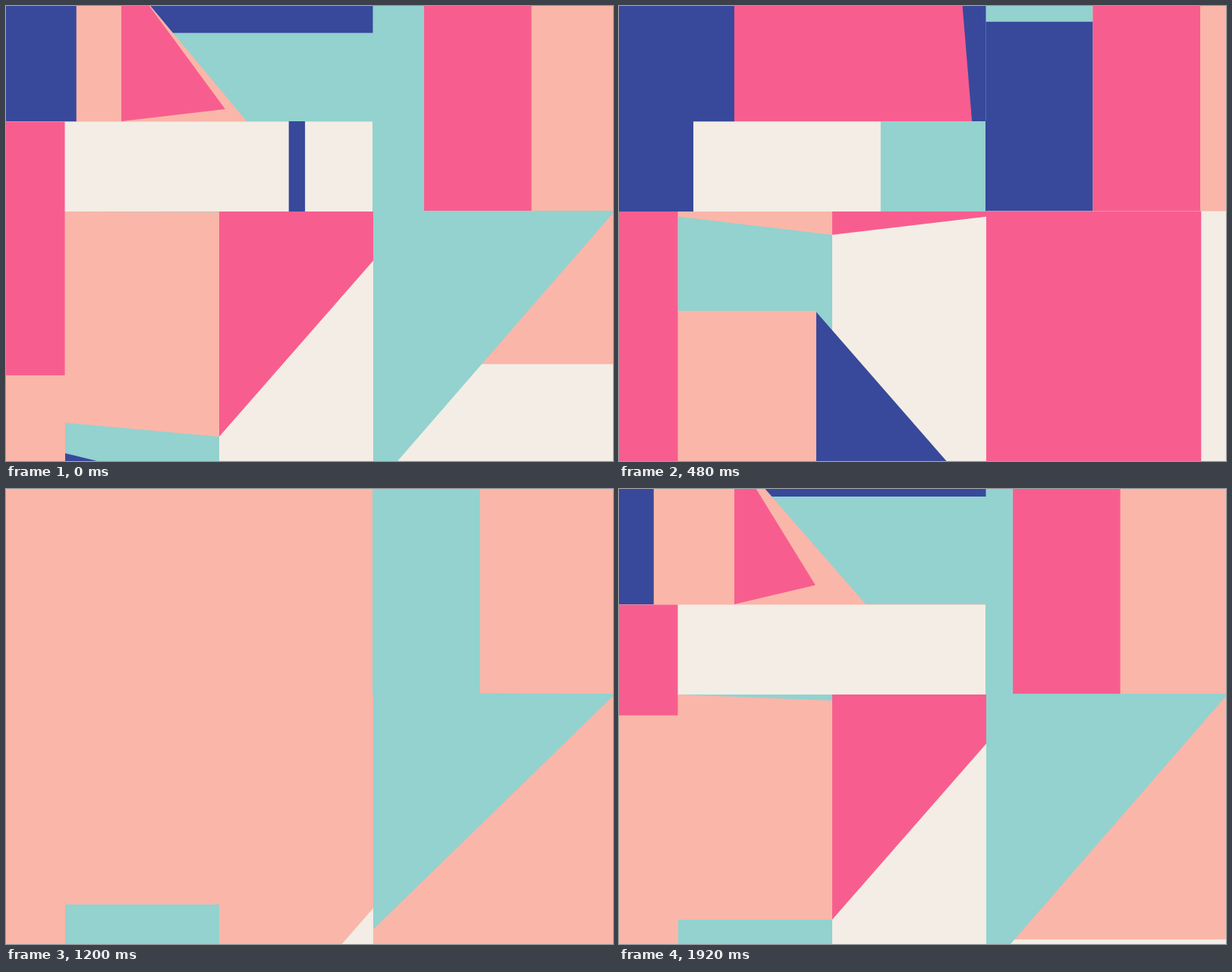
An HTML page with a canvas for the animation above (1.95 s loop, 800 px wide and 600 px high).

```html
<!DOCTYPE html>
<html lang="en">
<head>
<meta charset="utf-8">
<title>Shifting blocks</title>
<style>
  html, body { margin: 0; width: 100%; height: 100%; overflow: hidden; background: #fab6a9; }
  canvas { display: block; }
</style>
</head>
<body>
<canvas id="stage" width="800" height="600"></canvas>
<script>
const ctx = document.getElementById('stage').getContext('2d');
const LOOP = 1950, STEP = 30;
// The clock runs from the empty stage to the next empty stage.
const SEAM = 1110, END = SEAM + LOOP;
const SHIFT = 2200, SETTLED = 2551, LEAVE = 2857;
const PEACH = '#fab6a9', TEAL = '#93d2cf', PINK = '#f75e8f', CREAM = '#f3ede5', BLUE = '#38499b';
// Grid lines
const X1 = 78, X2 = 152, X3 = 281, X4 = 483.5, Y1 = 152.5, Y2 = 270.5;
const CELL = 203, COL = 141.5;

let t = SEAM;

const mix = (a, b, p) => a + (b - a) * p;

// Eased progress from start to end: quick pick-up, long settling.
function go(start, end, pull = 1.5) {
  const p = Math.min(1, Math.max(0, (t - start) / (end - start)));
  return 1 - (1 - p ** pull) ** 3;
}
const move = (a, b, start, end) => mix(a, b, go(start, end));

function poly(color, ...points) {
  ctx.fillStyle = color;
  ctx.beginPath();
  for (const [x, y] of points) ctx.lineTo(x, y);
  ctx.fill();
}
function box(color, l, t, r, b) {
  if (r > l && b > t) poly(color, [l, t], [r, t], [r, b], [l, b]);
}

function rightColumn(shift, leave) {
  const grown = move(COL, 0, 1230, 1495), slide = move(0, COL, 1873, 2101);
  const pinkLeft = 483 + grown + slide;
  const blueLeft = mix(483, 800, leave);
  if (t < SETTLED) box(TEAL, 483, 0, pinkLeft, Y2);
  box(PINK, 483, 0, blueLeft, mix(Y2, 0, leave));
  box(BLUE, blueLeft, mix(Y2, -8, shift), blueLeft + COL, Y2);
  box(PINK, pinkLeft, 0, 483 + COL + slide, move(Y2, 0, 2797, END));
}

function topPanel(shift) {
  // Slanted edge shared by teal and blue
  const swing = go(1560, 1830), hide = go(SETTLED, 2620);
  const exit = move(0, 331, 2904, END);
  const a = 143 + 57 * swing - move(0, 10, 1860, 1980) - 38 * hide + exit;
  const b = 296 + 52 * swing - move(0, 37, 1841, 2028) - 159 * hide + move(0, 331, 2880, END);
  const sheet = (color, h) => poly(color, [a, 0], [mix(a, b, h / 152), h], [X4, h], [X4, 0]);

  if (t < SETTLED) sheet(TEAL, move(0, 152, 1260, 1560));
  box(PEACH, 0, 0, X2, 152);
  sheet(BLUE, 152 * go(1904, 2235, 1.25));
  poly(PINK,
    [X2 + exit, 0],
    [mix(move(X2, 190, 1861, 1974), 483, shift), 0],
    [mix(move(X2, 311, 1832, 2024), 483, shift), move(95, 152, 1813, 2091)],
    [move(X2, 485, 2600, 2880), 152]);
  box(BLUE, 0, 0, move(0, X2, 1882, 2045), Y1);
}

function strip(shift) {
  box(CREAM, 0, Y1, move(0, 483, 1230, 1457), 271);
  box(BLUE, move(483, 77, 1920, 2059) - CELL * shift, 152, move(483, 280, 1920, 2016) - CELL * shift, 271);
  box(TEAL, move(483, 280, 2300, 2580), 152, 483, 271);
}

function lowerLeft(shift) {
  box(PINK, 0, move(Y1, 271, 2000, 2140), X1 - 0.5, move(Y1, 600, 1892, 2005));

  const top = move(600, 271, 1170, 1375);
  box(TEAL, X1, top, X3, 600);
  poly(PEACH, [X1, move(568, 271, 1700, 1930)], [X3, move(568, 271, 1700, 1979)], [X3, 568], [X1, 568]);
  const left = mix(move(568, 336, 1924, 2211), 271, shift), right = mix(568, 271, shift);
  poly(TEAL, [X1, Math.max(top, left)], [X3, Math.max(top, right)], [X3, 600], [X1, 600]);

  const grow = go(1260, 1543), x = mix(X3, 484, grow);
  if (t < SETTLED) poly(PINK, [X3, 271], [x, 271], [x, mix(300, 336, grow)], [X3, 568]);
}

function lowerRight(shift, leave) {
  if (t < SETTLED) {
    box(CREAM, 484, move(600, Y2, 1916, 2036), 800, 600);
    const tip = mix(800, 484, shift), low = move(270, 637, SEAM, 1260);
    poly(TEAL, [484, move(265, 270, SEAM, 1290)], [tip, 270], [tip, 273], [484, mix(low, 271, shift)]);
  }
  box(PINK, mix(484, 800, leave), Y2, mix(484, 800, shift), 600);
}

// Peach cover, cream cell and blue triangle pass over everything else.
function front(shift, leave) {
  const x = X1 + CELL * shift - move(0, 451, 2680, 3072);
  const spread = go(2560, 2760);
  const coverRight = mix(X1 + CELL * shift, 486, spread);
  box(PEACH, mix(X1, 0, spread), move(402, 0, 2782, END), coverRight, 600);

  const below = move(272, 0, 1170, 1342), fall = move(0, 329, 2850, END);
  const right = mix(X4 + 0.5, 470, leave);
  poly(CREAM,
    [X3, mix(568, 271, shift) + below + fall],
    [right, mix(336, 271, shift) + below + fall],
    [right, 900], [X3, 900]);

  poly(BLUE, [x, move(600, 403.5, 1935, 2155)], [x + move(0, 171.5, 1935, 2010), 600], [x, 600]);
}

function draw() {
  const shift = go(SHIFT, SETTLED), leave = go(LEAVE, END);
  box(PEACH, 0, 0, 800, 600);
  rightColumn(shift, leave);
  topPanel(shift);
  strip(shift);
  lowerLeft(shift);
  lowerRight(shift, leave);
  front(shift, leave);
}

const start = performance.now();
function frame() {
  const now = Math.max(0, performance.now() - start) % LOOP;
  t = Math.floor(now / STEP) * STEP;
  if (t < SEAM) t += LOOP;
  draw();
  requestAnimationFrame(frame);
}
frame();
</script>
</body>
</html>
```
